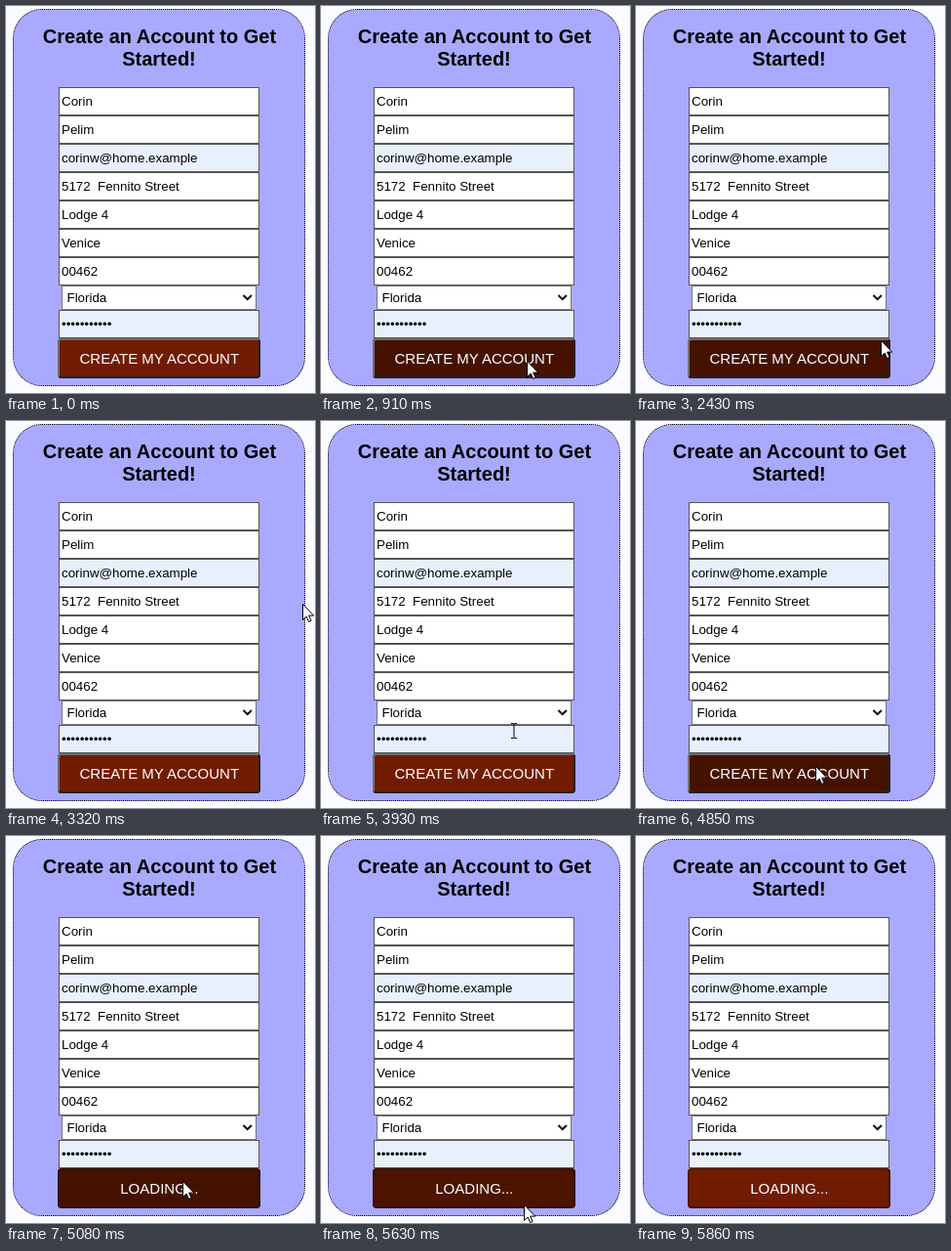
An HTML page that plays this animation: 317x396 px, repeating every 6480 ms.

```html
<!DOCTYPE html>
<html lang="en">
<head>
<meta charset="utf-8">
<title>Create an account</title>
<style>
  html, body { margin: 0; width: 100%; height: 100%; overflow: hidden; background: #fafaff; }
  svg { position: absolute; left: 0; top: 0; width: 317px; height: 396px; }
  .card { position: absolute; left: 7px; top: 3px; width: 300px; height: 386px; box-sizing: border-box;
    border: 1px dotted #000; border-radius: 30px; background: #a9a9ff; }
  text { font: 13.333px Arial, "Liberation Sans", sans-serif; white-space: pre; }
  .title { font-size: 20px; font-weight: bold; text-anchor: middle; }
  .label { font-size: 15px; fill: #fff; text-anchor: middle; }
</style>
</head>
<body>
<div class="card"></div>
<svg viewBox="0 0 317 396">
  <text class="title" x="157.5" y="38">Create an Account to Get</text>
  <text class="title" x="157" y="61">Started!</text>
  <g id="fields"></g>
  <rect id="select" x="57.5" y="286.5" width="199" height="24" fill="#fff"/>
  <text x="62.5" y="303">Florida</text>
  <path d="M243.5 296l4.2 4.2 4.2-4.2" fill="none" stroke="#000" stroke-width="2"/>
  <rect id="face" x="53" y="340" width="208" height="41" rx="4"/>
  <g fill="none" stroke-width="2">
    <path id="lit" d="M54 379V344a3 3 0 0 1 3-3H259"/>
    <path id="shade" d="M259 341.5a3 3 0 0 1 1 2.500V377a3 3 0 0 1-3 3H57a3 3 0 0 1-2.500-1"/>
  </g>
  <text id="label" class="label" x="157.3" y="366"></text>
  <path id="arrow" d="M.5.5V16.500l3.700-3.500 2.400 5.500 2.500-1.100-2.400-5.300h5z" fill="#fff" stroke="#000"/>
  <path id="beam" d="M-3-7.500h2.500l.5.500.5-.500H3M0-7V7M-3 7.500h2.500l.5-.500.5.500H3" fill="none" stroke="#000"/>
</svg>
<script>
const LOOP = 6480, LOADING_AT = 4860;
const NORMAL = [113, 28, 0], HOVER = [69, 18, 0];
const $ = id => document.getElementById(id);

function add(parent, tag, attrs, text = "") {
  const el = document.createElementNS("http://www.w3.org/2000/svg", tag);
  for (const k in attrs) el.setAttribute(k, attrs[k]);
  el.textContent = text;
  parent.append(el);
}

function field(y, value, fill) {
  add($("fields"), "rect", { x: 54.5, y: y + 0.5, width: 205, height: 28, fill, stroke: "#555" });
  add($("fields"), "text", { x: 57, y: y + 19 }, value);
}

const values = ["Corin", "Pelim", "corinw@home.example", "5172  Fennito Street", "Lodge 4", "Venice", "00462"];
values.forEach((v, i) => field(83 + 29 * i, v, i === 2 ? "#e8f0fe" : "#fff"));
field(311, "•".repeat(11), "#e8f0fe");

// Pointer strokes: start, end, from, to; it rests at the end until "until".
const moves = [
  { t0: 360, t1: 910, from: [236, 390], to: [211, 363], until: 1770 },
  { t0: 1770, t1: 1920, from: [211, 363], to: [208, 359], until: 2160 },
  { t0: 2160, t1: 2160, from: [207, 358], to: [207, 358], until: 2430 },
  { t0: 2430, t1: 2430, from: [251, 342], to: [251, 342], until: 2460 },
  { t0: 2460, t1: 2500, from: [297, 278], to: [297, 278], until: 2540 },
  { t0: 3320, t1: 3320, from: [304, 187], to: [304, 187], until: 3400 },
  { t0: 3400, t1: 3930, from: [300, 192], to: [198, 317], until: 4010 },
  { t0: 4010, t1: 4550, from: [198, 319], to: [189, 352], until: 4700 },
  { t0: 4700, t1: 5080, from: [189, 352], to: [181, 353], until: 5550 },
  { t0: 5550, t1: 5830, from: [184, 357], to: [232, 398], until: 5860 }
];

// Hover fades: start, end, target amount.
const fades = [[500, 910, 1], [2460, 2540, 0], [4110, 4500, 1], [5580, 5860, 0]];

const clamp = v => Math.max(0, Math.min(1, v));
const mix = (a, b, p) => a + (b - a) * p;
const easeOut = p => 1 - (1 - p) * (1 - p);

function pointer(t) {
  const m = moves.find(m => t >= m.t0 && t < m.until);
  if (!m) return null;
  const p = m.t1 > m.t0 ? easeOut(clamp((t - m.t0) / (m.t1 - m.t0))) : 1;
  return m.from.map((v, i) => mix(v, m.to[i], p));
}

function hover(t) {
  return fades.reduce((h, [a, b, to]) => mix(h, to, clamp((t - a) / (b - a))), 0);
}

function show(el, on, pos) {
  el.style.display = on ? "" : "none";
  if (on) el.setAttribute("transform", `translate(${pos.map(Math.round)})`);
}

function draw(t) {
  const pos = pointer(t), [x, y] = pos || [-1, -1];
  const inForm = x >= 54 && x < 260 && y >= 83 && y < 340;
  const onSelect = inForm && y >= 286 && y < 311;
  const typing = inForm && !onSelect;
  show($("arrow"), pos && !typing, pos);
  show($("beam"), pos && typing, pos);
  $("select").setAttribute("stroke", onSelect ? "#4f4f4f" : "#767676");

  const h = hover(t), busy = t >= LOADING_AT;
  $("face").setAttribute("fill", `rgb(${NORMAL.map((v, i) => Math.round(mix(v, HOVER[i], h)))})`);
  $("lit").setAttribute("stroke", busy ? "rgba(16,16,16,.3)" : "#6e6e6e");
  $("shade").setAttribute("stroke", busy ? "rgba(16,16,16,.45)" : "#222");
  const text = busy ? "LOADING..." : "CREATE MY ACCOUNT";
  if ($("label").textContent !== text) $("label").textContent = text;
}

const start = performance.now();
function tick() {
  draw((performance.now() - start) % LOOP);
  requestAnimationFrame(tick);
}
tick();
</script>
</body>
</html>
```
